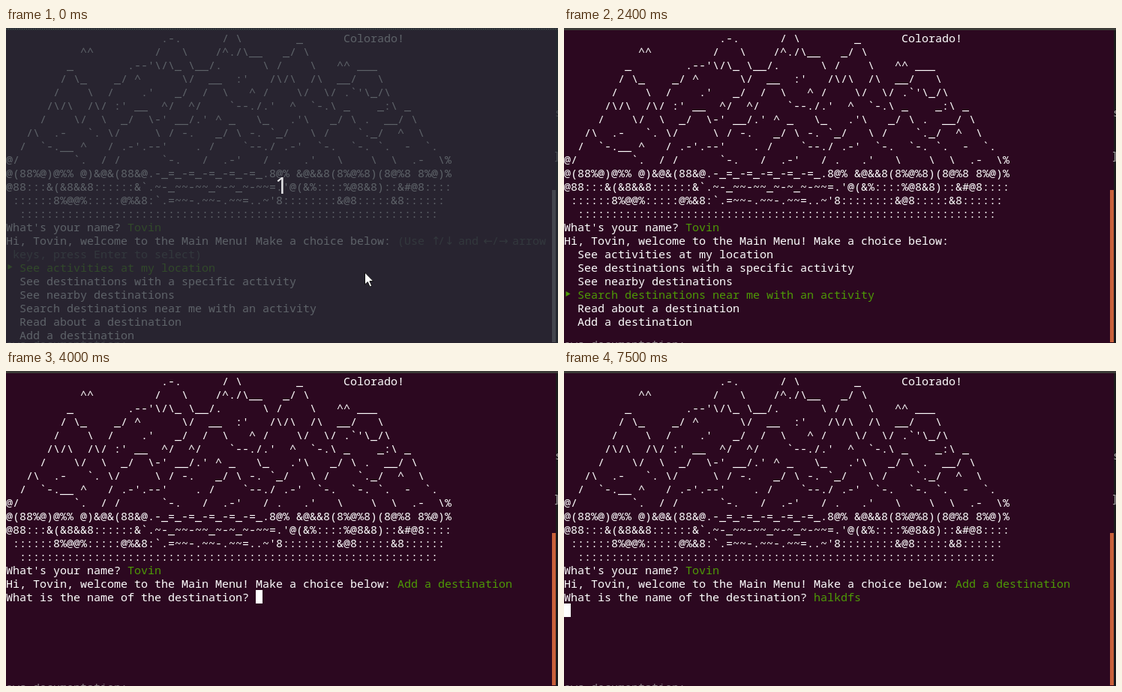
Recreate the animation shown at these times as an HTML page. Size 736 by 420 pixels, loop 8 s.

```html
<!DOCTYPE html>
<html lang="en">
<head>
<meta charset="utf-8">
<title>Terminal menu</title>
<style>
  html, body { margin: 0; width: 100%; height: 100%; overflow: hidden; background: #2c0820; }
  svg { display: block; width: 736px; height: 420px; }
  text { font: 15px "Noto Sans Mono", "Liberation Mono", monospace; white-space: pre; }
  .symbol { font: 15px "DejaVu Sans", sans-serif; }
  .count { font: 31px "Open Sans", sans-serif; }
</style>
</head>
<body>
<script type="text/plain" id="art">
                       .-.      / \        _      Colorado!
           ^^         /   \    /^./\__   _/ \
         _        .--'\/\_ \__/.      \ /    \   ^^ ___
        / \_    _/ ^      \/  __  :'   /\/\  /\  __/   \
       /    \  /    .'   _/  /  \   ^ /    \/  \/ .`'\_/\
      /\/\  /\/ :' __  ^/  ^/    `--./.'  ^  `-.\ _    _:\ _
     /    \/  \  _/  \-' __/.' ^ _   \_   .'\   _/ \ .  __/ \
   /\  .-   `. \/     \ / -.   _/ \ -. `_/   \ /    `._/  ^  \
  /  `-.__ ^   / .-'.--'    . /    `--./ .-'  `-.  `-. `.  -  `.
@/        `.  / /      `-.   /  .-'   / .   .'   \    \  \  .-  \%
@(88%@)@%% @)&@&(88&@.-_=_-=_-=_-=_-=_.8@% &@&&8(8%@%8)(8@%8 8%@)%
@88:::&(&8&&8::::::&`.~-_~~-~~_~-~_~-~~=.'@(&%::::%@8&8)::&#@8::::
 ::::::8%@@%:::::@%&8:`.=~~-.~~-.~~=..~'8::::::::&@8:::::&8::::::
  ::::::::::::::::::::::::::::::::::::::::::::::::::::::::::::::
</script>
<svg viewBox="0 0 736 420">
  <rect width="736" height="420" fill="#2c0820"/>
  <rect width="736" height="3" fill="#3c3b37"/>
  <rect x="733" y="3" width="3" height="417" fill="#1c1a1c"/>
  <g fill="#a9a3a6">
    <text x="732" y="118">s</text>
    <text x="730" y="175">]</text>
  </g>
  <clipPath id="edge"><rect y="417" width="736" height="3"/></clipPath>
  <text x="0" y="427" fill="#8d8389" clip-path="url(#edge)">ows documentation:</text>
  <rect id="bar" x="728" y="216" width="5" height="203"/>
  <g id="banner" fill="#fff"></g>
  <g id="session"></g>
  <path id="beam" d="M477.5 323.5h2l1 1 1-1h2M480.5 324v11M477.5 335.5h2l1-1 1 1h2" fill="none" stroke="#fff"/>
  <g id="countdown">
    <rect width="736" height="420" fill="#272e36" fill-opacity=".75"/>
    <path d="M0 1.5H736" stroke="#4a4c52" stroke-dasharray="1 2"/>
    <text class="count" x="367.5" y="221" text-anchor="middle" fill="#e8e8ea">1</text>
    <path d="M478.5 326v16l3.8-3.4 2.8 6.4 2.6-1.2-2.8-6.2h5z" fill="#fff" stroke="#111"/>
  </g>
</svg>
<script>
const LOOP = 8000, CELL = 9, LINE = 18, TOP = 4;
const WHITE = '#fff', GREEN = '#4e9a06', DIM = '#555753';
const NAME = 'Tovin';
const MENU = [
  'See activities at my location',
  'See destinations with a specific activity',
  'See nearby destinations',
  'Search destinations near me with an activity',
  'Read about a destination',
  'Add a destination',
  'Exit'
];
const PAGE = 6;
const ANSWER_COL = 37;

const $ = id => document.getElementById(id);
const escapeText = s => s.replace(/&/g, '&amp;').replace(/</g, '&lt;');
const print = (col, row, s, fill = WHITE, cls = '') =>
  `<text class="${cls}" x="${col * CELL}" y="${TOP + row * LINE + 15}" fill="${fill}">${escapeText(s)}</text>`;
const block = (col, row) =>
  `<rect x="${col * CELL}" y="${TOP + row * LINE}" width="${CELL}" height="${LINE}" fill="${WHITE}"/>`;

// Value of the last [time, value] step that has been reached.
const stepAt = (steps, t) => steps.filter(([start]) => t >= start).pop()[1];

const BAR = [[0, '#978d92'], [900, '#b07763'], [1000, '#c8603a']];
const CHOICE = [[0, 0], [1400, 1], [2400, 3], [2800, 4], [3500, 5]];
const TYPED = [[0, ''], [5800, 'ha'], [5900, 'hal'], [6200, 'halkd'], [6500, 'halkdf'], [7100, 'halkdfs']];
const CARET = [[0, true], [4500, false], [5500, true], [7000, false], [7100, true]];

function hint() {
  return print(58, 15, '(Use  /  and  /  arrow', DIM)
    + [[63, '↑'], [65, '↓'], [70.7, '←'], [73, '→']].map(([col, s]) => print(col, 15, s, DIM, 'symbol')).join('')
    + print(0, 16, ' keys, press Enter to select)', DIM);
}

function menu(choice) {
  const first = choice ? 16 : 17;
  const offset = Math.max(0, choice - PAGE + 2);
  const rows = MENU.slice(offset, offset + PAGE).map((item, i) =>
    print(2, first + i, item, i + offset === choice ? GREEN : WHITE));
  const y = TOP + (first + choice - offset) * LINE;
  return rows.join('') + `<path d="M2.5 ${y + 5}l6 3.5-6 3.5z" fill="${GREEN}"/>`;
}

function question(t) {
  const typed = stepAt(TYPED, t), done = t >= 7500;
  const caret = done ? block(0, 17) : stepAt(CARET, t) ? block(ANSWER_COL + typed.length, 16) : '';
  return print(58, 15, MENU[5], GREEN)
    + print(0, 16, 'What is the name of the destination?')
    + print(ANSWER_COL, 16, typed, done ? GREEN : WHITE) + caret;
}

function session(t) {
  const choice = stepAt(CHOICE, t);
  return print(0, 14, "What's your name?") + print(18, 14, NAME, GREEN)
    + print(0, 15, `Hi, ${NAME}, welcome to the Main Menu! Make a choice below:`)
    + (t >= 4000 ? question(t) : (choice ? '' : hint()) + menu(choice));
}

let shown = '';
function draw(t) {
  const markup = session(t);
  if (markup !== shown) $('session').innerHTML = shown = markup;
  $('bar').setAttribute('fill', stepAt(BAR, t));
  $('countdown').style.display = t < 500 ? '' : 'none';
  $('beam').style.display = t >= 500 && t < 1500 ? '' : 'none';
}

$('banner').innerHTML = $('art').textContent.split('\n').slice(1, -1)
  .map((line, row) => print(0, row, line)).join('');

const start = performance.now();
function tick() {
  draw((performance.now() - start) % LOOP);
  requestAnimationFrame(tick);
}
draw(0);
tick();
</script>
</body>
</html>
```
